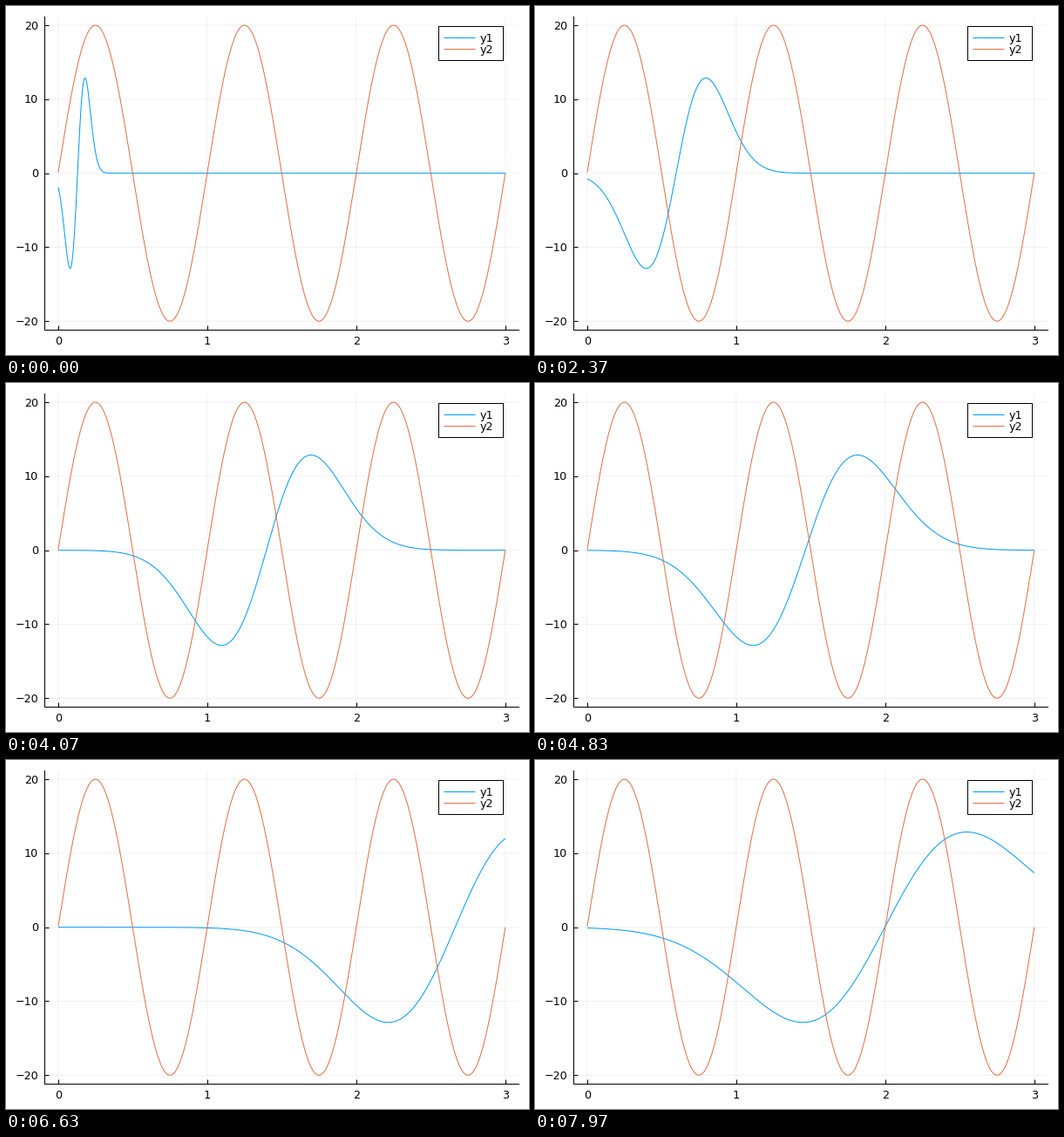
A matplotlib script that plays this animation: 600x400 px, repeating every 8 s.

```python
import matplotlib.pyplot as plt
import numpy as np
from matplotlib.animation import FuncAnimation

W, H, DPI = 600, 400, 100
POSES, LOOP_MS = 240, 8000
TICKS = 2 * POSES  # two ticks per pose, so a pose is centred on its time
PX = 72 / DPI  # one pixel in points
BLUE, ORANGE = "#009AFA", "#E26F46"
LEFT, RIGHT, TOP, BOTTOM = 44, 588, 12, 371

plt.rcParams["font.family"] = "DejaVu Sans"

fig = plt.figure(figsize=(W / DPI, H / DPI), dpi=DPI, facecolor="white")
ax = fig.add_axes([0, 0, 1, 1])
ax.set_xlim(0, W)
ax.set_ylim(H, 0)
ax.axis("off")


def sx(x):
    return 59.8 + 171 * x


def sy(y):
    return 191.67 - 8.48 * y


def line(xs, ys, color="black", **kw):
    kw.setdefault("solid_capstyle", "butt")
    return ax.plot(xs, ys, color=color, lw=PX, **kw)[0]


def label(x, baseline, text, ha):
    ax.text(x, baseline, text, ha=ha, va="baseline", fontsize=9.2, zorder=6)


def wavelet(x, center, half):
    u = (x - center) / (np.sqrt(2) * half)
    return 30 * u * np.exp(-u * u)


def draw_axes():
    grid = dict(alpha=0.055, zorder=1, snap=False)
    for v in range(4):
        line([sx(v)] * 2, [TOP, BOTTOM], **grid)
        line([sx(v)] * 2, [BOTTOM, BOTTOM - 5], zorder=2)
        label(sx(v), 387.6, str(v), "center")
    for v in range(-20, 21, 10):
        line([LEFT, RIGHT], [sy(v)] * 2, **grid)
        line([LEFT, LEFT + 5], [sy(v)] * 2, zorder=2)
        label(37, sy(v) + 4.6, str(v).replace("-", "\u2212"), "right")
    line([LEFT, RIGHT], [BOTTOM] * 2, zorder=2, solid_capstyle="projecting")
    line([LEFT] * 2, [TOP, BOTTOM], zorder=2, solid_capstyle="projecting")


def draw_legend():
    ax.add_patch(plt.Rectangle((496, 23), 74, 39, fc="white", ec="black",
                               lw=PX, zorder=5))
    for y, color, name in ((36, BLUE, "y1"), (49, ORANGE, "y2")):
        line([502, 538], [y, y], color, zorder=6)
        label(544, y + 4.9, name, "left")


x = np.linspace(0.001, 3, 1500)
draw_axes()
draw_legend()
pulse = line(sx(x), sy(0 * x), BLUE, zorder=3)
line(sx(x), sy(20 * np.sin(2 * np.pi * x)), ORANGE, zorder=4)


def update(tick):
    # the pulse sweeps 0..3 and widens after every sweep
    pose = (tick + 1) // 2 % POSES
    sweep, center = divmod(2 * (pose + 1) / 15 - 0.003, 3)
    pulse.set_ydata(sy(wavelet(x, center, 0.05 * (sweep + 1))))
    return [pulse]


anim = FuncAnimation(fig, update, frames=TICKS, interval=LOOP_MS / TICKS,
                     init_func=lambda: update(0), repeat=True, repeat_delay=0)
plt.show()
```
